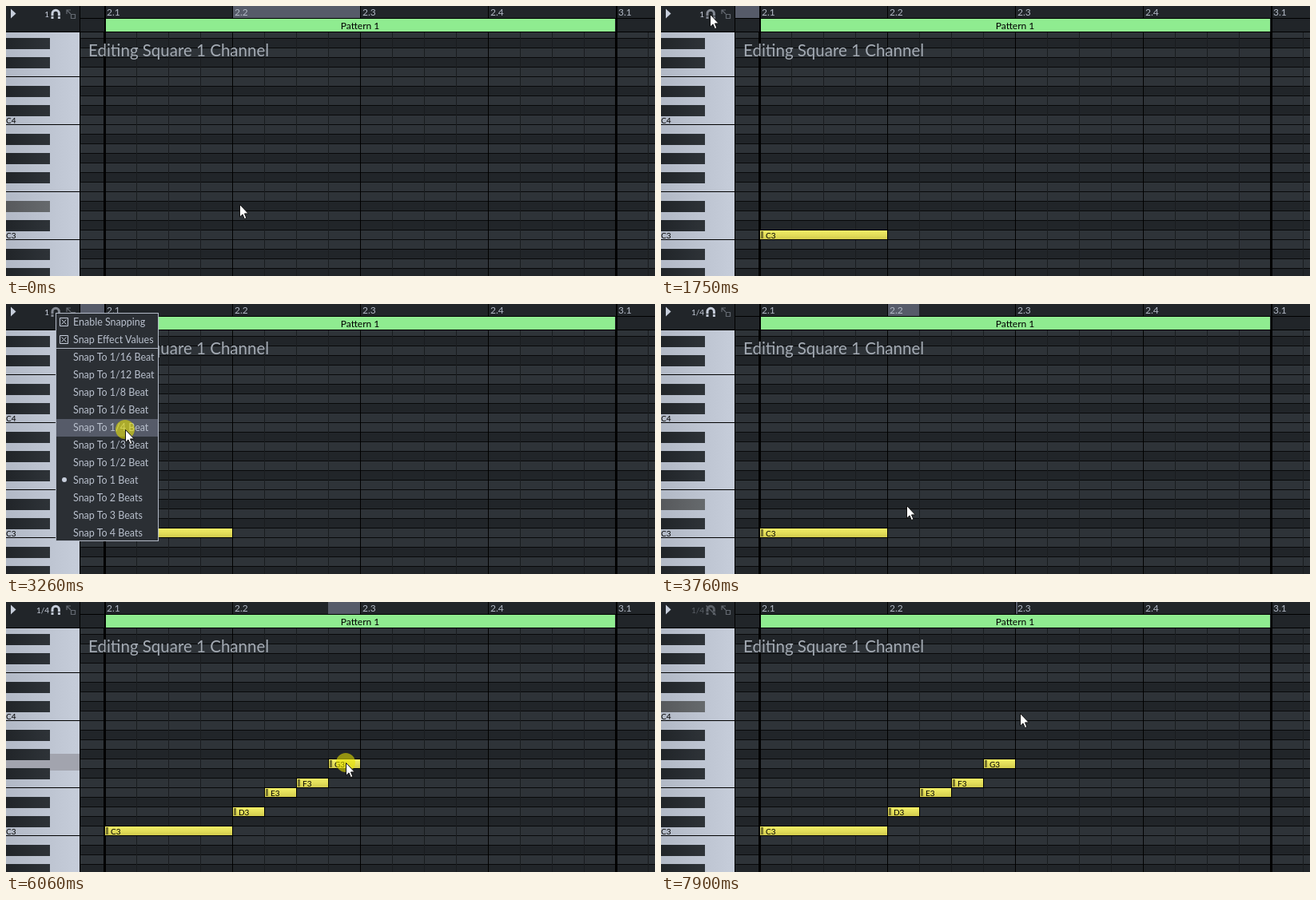
These frames come from a looping animation (812x338 px, 7990 ms). An HTML page:

```html
<!DOCTYPE html>
<html lang="en">
<head>
<meta charset="utf-8">
<title>Piano roll snapping</title>
<style>
html, body { margin: 0; width: 100%; height: 100%; overflow: hidden; background: #212529; }
svg { display: block; width: 812px; height: 338px; cursor: default; }
text { font-family: Lato, "Open Sans", sans-serif; font-size: 12px; fill: #c6cdda; white-space: pre; }
rect { shape-rendering: crispEdges; }
.small { font-size: 10px; fill: #000; }
.ruler { fill: #b2b9c6; }
.title { font-size: 20.5px; fill: #a4abb4; }
.item { font-size: 12.5px; fill: #b9c0cd; }
.icon { fill: none; stroke: #c6cdda; }
</style>
</head>
<body>
<svg id="stage" viewBox="0 0 812 338">
  <defs>
    <linearGradient id="white"><stop stop-color="#b2b9c6"/><stop offset="1" stop-color="#c6cdda"/></linearGradient>
    <linearGradient id="black"><stop stop-color="#212529"/><stop offset="1" stop-color="#2e3338"/></linearGradient>
    <linearGradient id="blackHover"><stop stop-color="#57595c"/><stop offset="1" stop-color="#666a6d"/></linearGradient>
    <linearGradient id="yellow" x2="0" y2="1"><stop stop-color="#f4f067"/><stop offset="1" stop-color="#d2cc4d"/></linearGradient>
  </defs>
  <g id="grid"></g>
  <g id="notes"></g>
  <text class="title" x="103" y="63">Editing Square 1 Channel</text>
  <g id="keys"></g>
  <g id="header"></g>
  <g id="tools">
    <path d="M6 3.5L12.5 9.5L6 15.5Z" fill="#c6cdda"/>
    <g id="snap">
      <text id="snapText" class="small" x="54" y="14" text-anchor="end" style="fill:#c6cdda"></text>
      <g id="magnet" class="icon" stroke-width="3">
        <path d="M58 12.3V9.5a4.2 4.2 0 0 1 8.4 0V12.3M58 13.3V16M66.4 13.3V16"/>
        <path id="slash" d="M56.5 4.5L68.5 16.5" stroke-width="1.4"/>
      </g>
    </g>
    <g class="icon" opacity=".4" stroke-width="1.2">
      <path d="M76 10V5H81M76 5L81 10"/><path d="M81.5 10.5H86.5V15.5H81.5Z"/>
    </g>
  </g>
  <g id="menu"></g>
  <circle id="press" r="12" fill="#e8e400" opacity=".58"/>
  <path id="arrow" d="M.5 .5V16.2L4 12.9L6.4 18.6L8.9 17.5L6.5 11.9H11.3Z" fill="#fff" stroke="#111" stroke-width="1"/>
</svg>
<script>
const LOOP = 7990, LEFT = 93, BAR = 124, BEAT = 160, ROW = 12, BASE = 292;
const $ = id => document.getElementById(id);
const rect = (x, y, w, h, fill, more = '') =>
  `<rect x="${x}" y="${y}" width="${w}" height="${h}" fill="${fill}" ${more}/>`;
const text = (x, y, s, cls, more = '') => `<text x="${x}" y="${y}" class="${cls}" ${more}>${s}</text>`;
const show = (el, on) => el.setAttribute('visibility', on ? 'visible' : 'hidden');
const move = (el, x, y) => el.setAttribute('transform', `translate(${x} ${y})`);

// semitone 0 is C3
const BLACK = [1, 3, 6, 8, 10];
const tone = n => (n + 24) % 12;
const isBlack = n => BLACK.includes(tone(n));
const top_ = n => BASE - ROW * (n + 1);

function drawGrid() {
  let s = '';
  for (let n = -4; n < 22; n++) {
    s += rect(LEFT, top_(n), 719, ROW, isBlack(n) ? '#212529' : '#2e3338');
    s += rect(LEFT, top_(n) + ROW, 719, 1, '#08090a');
  }
  for (let i = 1; i < 18; i++) {
    const x = BAR + i * 40 - 1;
    if (i % 16) s += rect(x, 33, 1, 305, i % 4 ? '#191c1f' : '#000');
  }
  s += rect(BAR - 2, 33, 3, 305, '#000') + rect(BAR + 638, 33, 3, 305, '#000');
  $('grid').innerHTML = s;
}

// box of a white key: three share the C-E span, four the F-B span
function whiteBox(n) {
  const octave = BASE - 144 * Math.floor(n / 12), t = tone(n);
  return t < 5 ? [octave - 20 * (t / 2 + 1), 20] : [octave - 60 - 21 * ((t - 3) / 2), 21];
}

function drawKeys() {
  let s = rect(0, 33, 92, 305, 'url(#white)') + rect(0, 0, 92, 20, '#a2a4ae', 'id="whiteHover"');
  for (let n = -4; n < 21; n++) {
    const y = top_(n), t = tone(n);
    if (isBlack(n)) s += rect(0, y, 55, 14, 'url(#black)', `id="key${n}"`);
    if (t === 0 || t === 5) s += rect(0, y + ROW, 92, 1, '#000');
    if (t === 0) s += text(0, y + 11, 'C' + (3 + n / 12), 'small');
  }
  $('keys').innerHTML = s + rect(92, 0, 1, 338, '#000');
}

function drawHeader() {
  let s = rect(0, 0, 812, 33, '#212529') + rect(0, 0, 0, 15, '#565b69', 'id="span"');
  s += rect(LEFT, 15, 719, 1, '#000') + rect(0, 32, 812, 1, '#000') + rect(92, 0, 1, 33, '#000');
  for (let i = 0; i < 5; i++) {
    const edge = i % 4 === 0;
    s += rect(BAR + i * BEAT - 1, 0, edge ? 2 : 1, edge ? 33 : 15, '#000');
    s += text(BAR + i * BEAT + 2, 12, `${2 + (i >> 2)}.${1 + i % 4}`, 'ruler');
  }
  s += rect(125, 16, 637, 16, '#8fec90');
  s += text(443, 28.5, 'Pattern 1', '', 'text-anchor="middle" style="fill:#000"');
  $('header').innerHTML = s;
}

// time, x, width, semitone, name
const NOTES = [
  [710, 124, 159, 0, 'C3'], [3990, 284, 39, 2, 'D3'], [4640, 324, 39, 4, 'E3'],
  [5130, 364, 39, 5, 'F3'], [6060, 404, 39, 7, 'G3']
];
function drawNotes() {
  $('notes').innerHTML = NOTES.map(([, x, w, n, name]) => {
    const y = top_(n) + 1;
    return '<g>' + rect(x - 1, y - 1, w + 2, 13, '#000') + rect(x, y, w, 11, 'url(#yellow)') +
      rect(x + 1, y + 1, 3, 9, '#77742f') + text(x + 7, y + 9.5, name, 'small') + '</g>';
  }).join('');
}

const ITEMS = ['Enable Snapping', 'Snap Effect Values',
  ...['1/16', '1/12', '1/8', '1/6', '1/4', '1/3', '1/2', '1'].map(v => `Snap To ${v} Beat`),
  ...[2, 3, 4].map(v => `Snap To ${v} Beats`)];
function drawMenu() {
  let s = rect(0, 0, 129, 286, '#b2b9c6') + rect(1, 1, 127, 284, '#2b2f34');
  s += rect(1, 1, 127, 22, '#565b69', 'id="hot"') + rect(1, 44, 127, 1, '#b2b9c6');
  ITEMS.forEach((label, i) => {
    const y = 11 + 22 * i;
    s += text(22, y + 4.5, label, 'item');
    if (i < 2) s += `<path class="icon" d="M5.5 ${y - 4.5}h10v10h-10zM7.5 ${y - 2.5}l6 6m0 -6l-6 6"/>`;
  });
  $('menu').innerHTML = s + '<circle id="dot" cx="11" r="3" fill="#c6cdda"/>';
}

// start, end, steps, x, y
const MOVES = [
  [70, 550, 7, 142, 285], [870, 1430, 8, 70, 20], [1510, 1590, 2, 61, 10],
  [1990, 2470, 7, 149, 176], [2630, 2870, 4, 149, 157],
  [3340, 3760, 6, 307, 252], [3840, 3840, 1, 304, 258], [4150, 4490, 5, 348, 239],
  [4800, 4960, 3, 386, 226], [5290, 5450, 3, 442, 194], [5600, 5680, 2, 425, 201],
  [6220, 6830, 9, 59, 10], [7250, 7330, 2, 112, 21],
  [7640, 7820, 3, 445, 133], [7900, 7900, 1, 449, 139]
];
function cursorAt(t) {
  let x = 292, y = 248;
  for (const [t0, t1, n, x1, y1] of MOVES) {
    if (t < t0) break;
    const k = t >= t1 ? n : Math.floor((t - t0) / (t1 - t0) * (n - 1) + 1e-6) + 1;
    const e = .5 - .5 * Math.cos(Math.PI * k / n);
    x += (x1 - x) * e;
    y += (y1 - y) * e;
  }
  return [x, y];
}

const PRESSES = [[710, 870], [1670, 1750], [3260, 3340], [3990, 4150], [4640, 4800],
  [5130, 5290], [6060, 6220], [7080, 7170], [7560, 7640]];
// open, close, x, chosen item
const MENUS = [[1830, 3340, 62, 9], [7170, 7640, 60, 6]];
const within = t => ([a, b]) => t >= a && t < b;

function setKey(y) {
  const n = y > 32 ? Math.floor((BASE - y) / ROW) : null;
  for (let k = -4; k < 21; k++) {
    if (isBlack(k)) $('key' + k).setAttribute('fill', k === n ? 'url(#blackHover)' : 'url(#black)');
  }
  const white = n !== null && !isBlack(n);
  show($('whiteHover'), white);
  if (white) {
    const [top, h] = whiteBox(n);
    $('whiteHover').setAttribute('y', top);
    $('whiteHover').setAttribute('height', h);
  }
}

function setSpan(x, size) {
  let a = x - 2, b = x + 1;
  if (size) {
    a = BAR - 1 + Math.floor((x - BAR + 1) / size) * size;
    b = a + size;
  }
  a = Math.max(a, LEFT);
  $('span').setAttribute('x', a);
  $('span').setAttribute('width', Math.max(0, b - a));
}

function render(t) {
  const [x, y] = cursorAt(t), menu = MENUS.find(within(t));
  const [hx, hy] = cursorAt(menu ? menu[0] : t - 80);
  const fine = t >= 3340, off = t >= 7640;

  move($('arrow'), Math.round(x), Math.round(y));
  move($('press'), Math.round(x), Math.round(y));
  show($('press'), PRESSES.some(within(t)));
  [...$('notes').children].forEach((el, i) => show(el, t >= NOTES[i][0]));

  setKey(hy);
  setSpan(hx, off ? 0 : fine ? 40 : BEAT);
  $('snapText').textContent = fine ? '1/4' : '1';
  $('snap').setAttribute('opacity', off ? .35 : 1);
  const over = hx > 54 && hx < 70 && hy < 18;
  $('magnet').setAttribute('opacity', over && !off ? .6 : 1);
  show($('slash'), off);

  $('menu').style.display = menu ? '' : 'none';
  if (menu) {
    move($('menu'), menu[2], 11);
    const i = Math.floor((y - 12) / 22);
    show($('hot'), i >= 0);
    $('hot').setAttribute('y', 1 + 22 * Math.max(i, 0));
    $('dot').setAttribute('cy', 11 + 22 * menu[3]);
  }
}

drawGrid();
drawKeys();
drawHeader();
drawNotes();
drawMenu();
const start = performance.now();
function tick() {
  render((performance.now() - start) % LOOP);
  requestAnimationFrame(tick);
}
tick();
</script>
</body>
</html>
```
